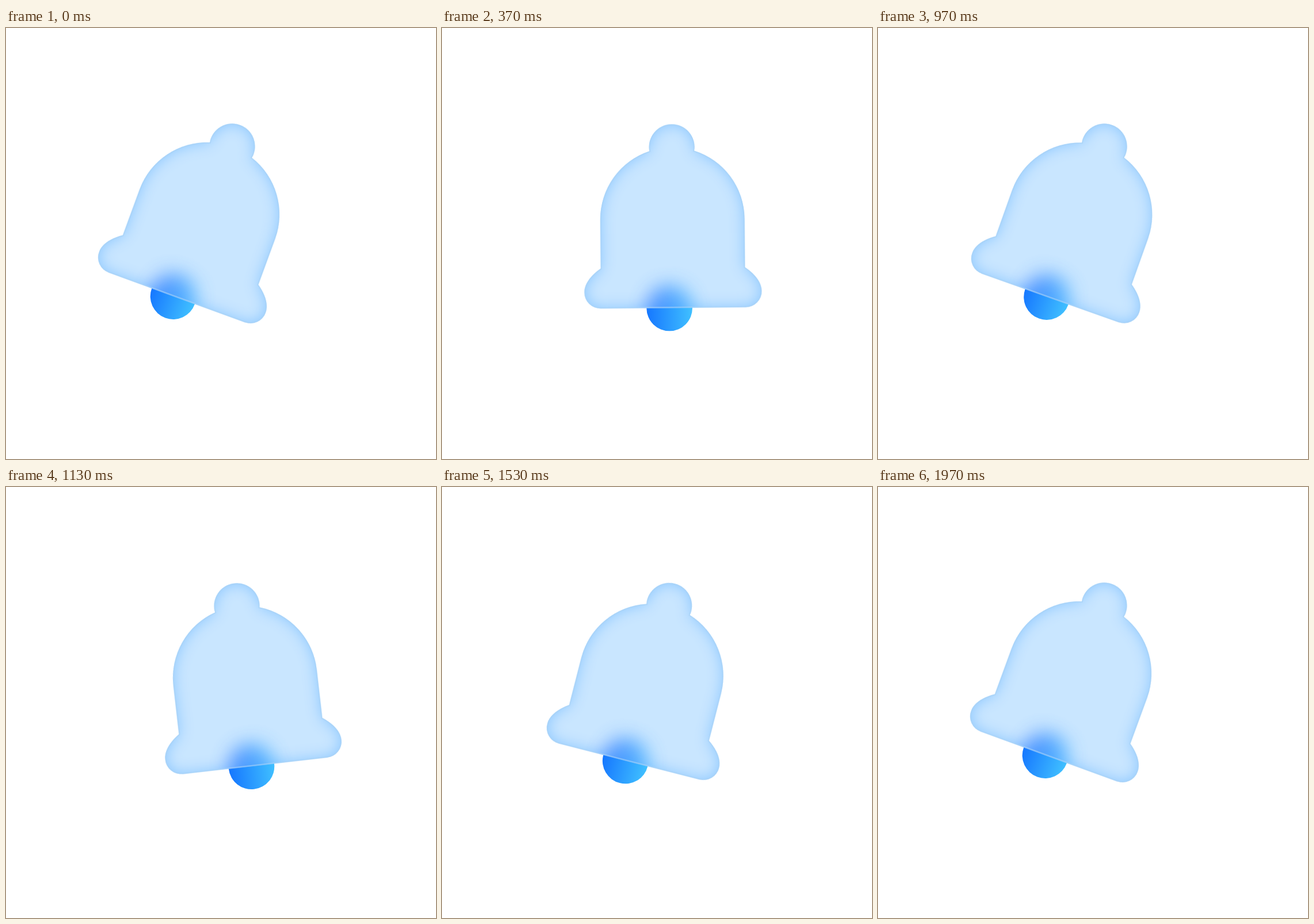
Animation, 747 px wide and 750 px high, one loop 2.01 s. Source, as an HTML page:

```html
<!DOCTYPE html>
<html lang="en">
<head>
<meta charset="utf-8">
<title>Ringing bell</title>
<style>
  html, body { margin: 0; width: 100%; height: 100%; overflow: hidden; background: #fff; }
  svg { display: block; width: 100%; height: 100%; }
</style>
</head>
<body>
<svg viewBox="0 0 747 750">
  <defs>
    <path id="shape" d="M-38.9 24.4 A39.5 39.5 0 1 1 38.9 24.4 A125.3 125.3 0 0 1 125.3 143.5
      V228 C140 238 154 253 154 269.5 A28 28 0 0 1 126 297.5
      H-126 A28 28 0 0 1 -154 269.5 C-154 253 -140 238 -125.3 228
      V143.5 A125.3 125.3 0 0 1 -38.9 24.4Z"/>
    <clipPath id="inside"><use href="#shape"/></clipPath>
    <linearGradient id="metal">
      <stop offset="0" stop-color="#1677ff"/>
      <stop offset="1" stop-color="#40c0ff"/>
    </linearGradient>
    <linearGradient id="haze">
      <stop offset="0" stop-color="#2f74ff"/>
      <stop offset="1" stop-color="#3cb4ff"/>
    </linearGradient>
    <filter id="blur" x="-80%" y="-80%" width="260%" height="260%" color-interpolation-filters="sRGB">
      <feGaussianBlur stdDeviation="16"/>
    </filter>
    <filter id="innerShade" x="-25%" y="-25%" width="150%" height="150%" color-interpolation-filters="sRGB">
      <feComponentTransfer in="SourceAlpha"><feFuncA type="linear" slope="-1" intercept="1"/></feComponentTransfer>
      <feGaussianBlur stdDeviation="13" result="edge"/>
      <feFlood flood-color="#88c5ff"/>
      <feComposite in2="edge" operator="in"/>
      <feComposite in2="SourceAlpha" operator="in" result="shade"/>
      <feMerge><feMergeNode in="SourceGraphic"/><feMergeNode in="shade"/></feMerge>
    </filter>
  </defs>
  <g id="bell">
    <circle cx="-6.5" cy="298" r="39.8" fill="url(#metal)"/>
    <use href="#shape" fill="#c9e6ff" filter="url(#innerShade)"/>
    <g clip-path="url(#inside)">
      <circle cx="-6.5" cy="298" r="39.8" fill="url(#haze)" filter="url(#blur)" opacity=".78"/>
      <use href="#shape" fill="none" stroke="#a9d3f6" stroke-opacity=".6" stroke-width="4"/>
    </g>
  </g>
</svg>
<script>
  const LOOP = 2010, STEP = 100 / 3, LAST = 59;
  const SWINGS = 4, AMPLITUDE = 20.1;
  const bell = document.getElementById('bell');
  const ease = x => x * x * (3 - 2 * x);

  function angleAt(ms) {
    const step = Math.min(LAST, Math.floor((ms + 3.4) / STEP));
    const phase = (step / LAST * SWINGS) % 1;
    const away = 1 - Math.abs(1 - 2 * phase);
    return AMPLITUDE * (1 - 2 * ease(away));
  }

  function draw(ms) {
    bell.setAttribute('transform', `translate(399 189.5) rotate(${angleAt(ms).toFixed(3)})`);
  }

  const start = performance.now();
  function tick() {
    draw((performance.now() - start) % LOOP);
    requestAnimationFrame(tick);
  }
  draw(0);
  requestAnimationFrame(tick);
</script>
</body>
</html>
```
